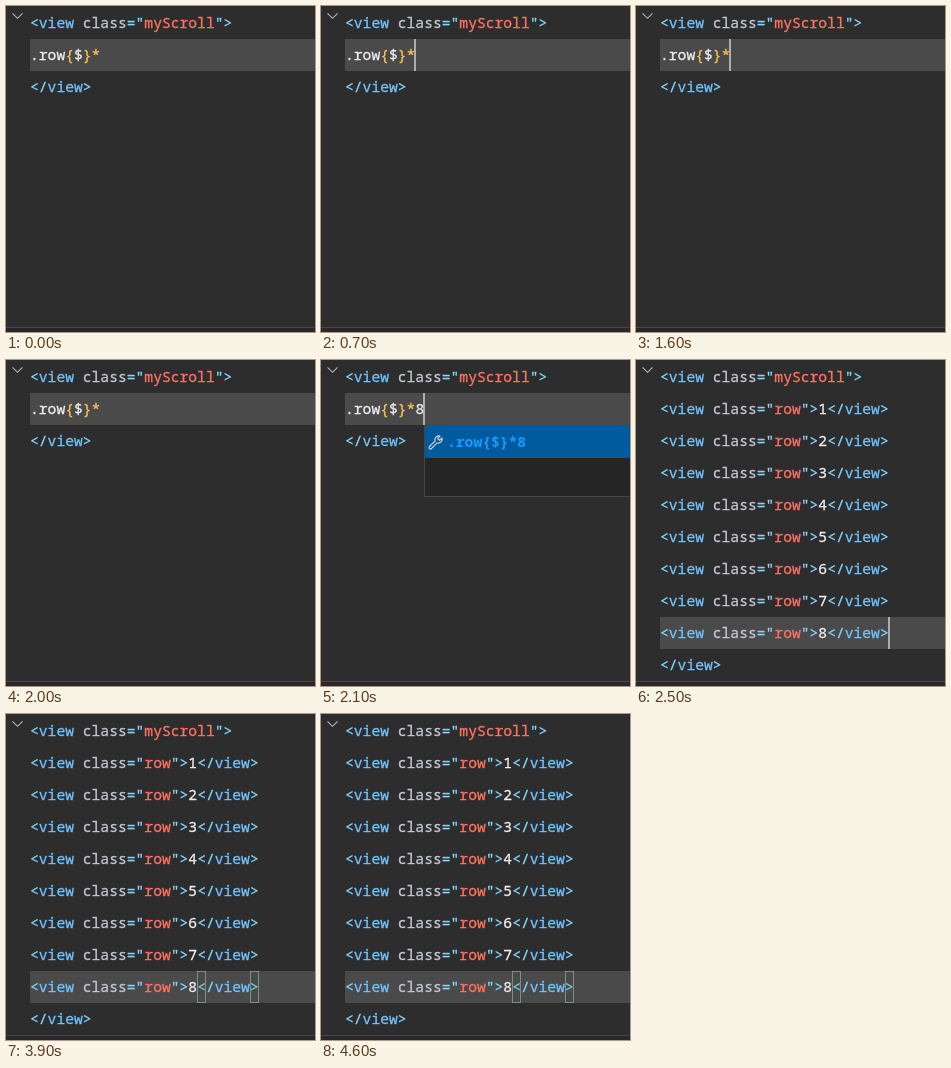
Recreate the animation shown at these times as an HTML page. Size 309 px wide and 326 px high, loop 4.7 s.

```html
<!DOCTYPE html>
<html lang="en">
<head>
<meta charset="utf-8">
<title>Snippet expansion</title>
<style>
  html, body { margin: 0; width: 100%; height: 100%; overflow: hidden; background: #2d2d2d; }
  svg { display: block; }
  text {
    font: 14.667px "Noto Sans Mono", "DejaVu Sans Mono", monospace;
    white-space: pre; fill: currentColor; stroke: currentColor; stroke-width: 0.3; color: #f0f0f0;
  }
  tspan { fill: currentColor; stroke: currentColor; }
  .punct { color: #80d8ff; }
  .tag { color: #6fc3ff; }
  .attr { color: #c3c8d4; }
  .value { color: #ff7262; }
  .brace { color: #ffc552; }
  .match { fill: #00640019; stroke: #888; }
  .suggestion { font-weight: bold; stroke: none; color: #189cff; }
</style>
</head>
<body>
<svg width="309" height="326" viewBox="0 0 309 326">
  <rect width="309" height="326" fill="#2d2d2d"/>
  <rect y="321" width="309" height="1" fill="#4a4548"/>
  <rect y="322" width="309" height="4" fill="#2b2629"/>
  <path d="M6.5 7.3 11.5 12.3 16.5 7.3" fill="none" stroke="#b8b8b8" stroke-width="1.1"/>
  <rect id="highlight" x="24" width="285" height="32" fill="#4a4a4a"/>
  <g id="opening"></g>
  <g id="typing"></g>
  <g id="expanded"></g>
  <g id="matches" class="match">
    <rect x="191.5" y="257.5" width="8" height="31"/>
    <rect x="244.5" y="257.5" width="8" height="31"/>
  </g>
  <rect id="cursor" width="2" height="32" fill="#aeafad"/>
  <g id="popup">
    <rect x="103.5" y="65.5" width="220" height="71" fill="#252526" stroke="#454545"/>
    <rect x="104" y="66" width="205" height="32" fill="#005a9e"/>
    <path d="M108.5 86.5 114.2 80.8A3.8 3.8 0 0 1 119 76L116.6 78.4 118.6 80.4 121 78A3.8 3.8 0 0 1 116.2 82.8L110.5 88.5A1.4 1.4 0 0 1 108.5 86.5Z"
          fill="none" stroke="#d0d0d0" stroke-width="1.2" stroke-linejoin="round"/>
    <text class="suggestion" x="126" y="87">.row{$}*8</text>
  </g>
</svg>
<script>
const LOOP = 4700, TYPED = 2100, EXPANDED = 2500, MATCHED = 2600;
const BLINKS = [700, 1100, 1600, 2000, 2100, 3000, 3500, 3900, 4400, 4600];

const el = id => document.getElementById(id);
const show = (id, on) => el(id).style.display = on ? "" : "none";
const lineTop = line => 1 + 32 * line;
const span = (kind, text) =>
  `<tspan class="${kind}">${text.replace(/</g, "&lt;")}</tspan>`;
const row = (line, content) => `<text x="24" y="${lineTop(line) + 21}">${content}</text>`;
const openTag = name =>
  span("punct", "<") + span("tag", "view") + span("attr", " class") +
  span("punct", '="') + span("value", name) + span("punct", '">');
const closeTag = span("punct", "</") + span("tag", "view") + span("punct", ">");

el("opening").innerHTML = row(0, openTag("myScroll"));
el("typing").innerHTML =
  row(1, ".row" + span("brace", "{") + "$" + span("brace", "}*") + '<tspan id="count">8</tspan>') +
  row(2, closeTag);
for (let n = 1; n <= 8; n++) el("expanded").innerHTML += row(n, openTag("row") + n + closeTag);
el("expanded").innerHTML += row(9, closeTag);

function draw(now) {
  const t = now % LOOP;
  const typed = t >= TYPED, expanded = t >= EXPANDED;
  const line = expanded ? 8 : 1;
  show("typing", !expanded);
  show("expanded", expanded);
  show("count", typed);
  show("popup", typed && !expanded);
  show("matches", t >= MATCHED);
  show("cursor", BLINKS.filter(b => b <= t).length % 2);
  el("highlight").setAttribute("y", lineTop(line));
  el("cursor").setAttribute("y", lineTop(line));
  el("cursor").setAttribute("x", expanded ? 252 : typed ? 102 : 93);
}

const start = performance.now();
function tick() {
  draw(performance.now() - start);
  requestAnimationFrame(tick);
}
tick();
</script>
</body>
</html>
```
